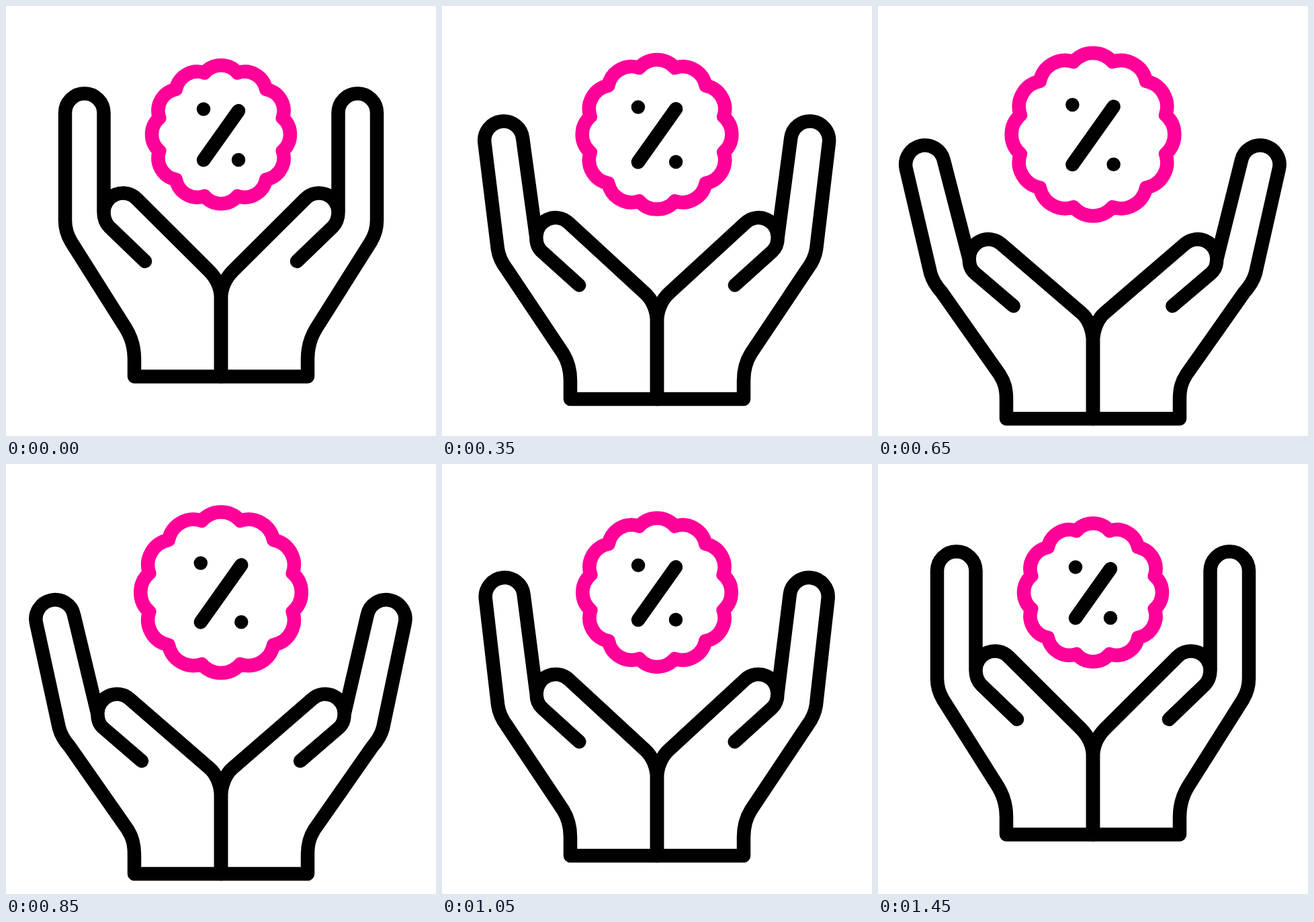
Animation of 640x640 px, one loop 1.5 s. Source, as an HTML page:

```html
<!DOCTYPE html>
<html lang="en">
<head>
<meta charset="utf-8">
<title>Hands and discount badge</title>
<style>
  html, body { margin: 0; width: 100%; height: 100%; overflow: hidden; background: #fff; }
  svg { display: block; width: 100vw; height: 100vh; }
  path { fill: none; stroke: #000; stroke-width: 20.5; stroke-linecap: round; stroke-linejoin: round; }
  #badge { stroke: #ff0099; }
</style>
</head>
<body>
<svg viewBox="0 0 640 640">
  <path id="left"/>
  <path id="right" transform="matrix(-1 0 0 1 640 0)"/>
  <path id="badge"/>
  <path id="percent"/>
</svg>
<script>
const LOOP = 1500, STEP = 50, DROP = 58.5;
const $ = id => document.getElementById(id);

// [time in ms, how far the hands have sunk]
const KEYS = [[0, 0], [100, 1.5], [200, 8.3], [450, 50], [550, 58.5], [700, 63.5],
  [850, 58.5], [1050, 31.5], [1100, 24.5], [1250, 4], [1350, 0.3], [1400, 0], [1500, 0]];

const closed = `M320 551.5 L191 551.5 L191 525 C191 509 187 494 178.5 480
  L97 351 C91 341 88 331 88 319 L88 159 A28 28 0 0 1 145.5 159 L145.5 307
  A28.6 28.6 0 0 1 194.5 287 L302 394 C313 405 320 420 320 436 L320 551.5
  M145.5 307 C145.5 317 149 324 154 329 L207 380`;

// The right finger leans a touch less than the left one.
const open = dx => `M320 610 L191 610 L191 581 C191 565 188 555 181 544
  L95 421 C87 412 82 404 79 393 L${45 + dx} 236.6 A28 28 0 0 1 ${101.1 + dx} 224.8 L136.4 372
  A28.6 28.6 0 0 1 183.8 349.5 L302 452 C313 461 320 478 320 496 L320 610
  M136.4 372 C136.4 381 139 388 145 393 L202 442`;

const numbers = s => s.match(/[\d.]+/g).map(Number);

function morph(from, to) {
  const a = numbers(from), b = numbers(to);
  return p => {
    let i = 0;
    // Number() keeps the arc flags as plain 0 and 1.
    return from.replace(/[\d.]+/g, () => {
      const v = a[i] + (b[i] - a[i]) * p;
      i++;
      return Number(v.toFixed(2));
    });
  };
}

const leftHand = morph(closed, open(0));
const rightHand = morph(closed, open(1.2));

function slope(i) {
  const a = KEYS[i - 1], b = KEYS[i + 1];
  return a && b ? (b[1] - a[1]) / (b[0] - a[0]) : 0;
}

function sink(t) {
  let i = 0;
  while (t >= KEYS[i + 1][0]) i++;
  const [t0, v0] = KEYS[i], [t1, v1] = KEYS[i + 1];
  const h = t1 - t0, s = (t - t0) / h, q = 1 - s;
  const v = v0 * q * q * (1 + 2 * s) + v1 * s * s * (3 - 2 * s)
    + h * s * q * (q * slope(i) - s * slope(i + 1));
  return Math.max(0, v);
}

const CX = 320, CY = 191.2;
const at = (x, y, k) => `${(CX + x * k).toFixed(2)} ${(CY + y * k).toFixed(2)}`;

function scallops(k) {
  const valley = 95, r = 32.6 * k;
  let d = '';
  for (let i = 0; i <= 12; i++) {
    const a = (i * 30 - 15) * Math.PI / 180;
    const point = at(valley * Math.sin(a), -valley * Math.cos(a), k);
    d += i ? `A${r} ${r} 0 0 1 ${point}` : `M${point}`;
  }
  return d + 'Z';
}

function percent(k) {
  const dot = (x, y) => `M${at(x, y, k)}h.01`;
  return `M${at(26, -35.2, k)}L${at(-26, 38, k)}` + dot(-26, -37.6) + dot(26, 37.8);
}

function draw(now) {
  const t = Math.floor((now % LOOP) / STEP) * STEP;
  const p = sink(t) / DROP;
  const k = 1 + 0.163 * p ** 1.25;
  $('left').setAttribute('d', leftHand(p));
  $('right').setAttribute('d', rightHand(p));
  $('badge').setAttribute('d', scallops(k));
  $('percent').setAttribute('d', percent(k));
}

const start = performance.now();
function tick() {
  draw(performance.now() - start);
  requestAnimationFrame(tick);
}
tick();
</script>
</body>
</html>
```
